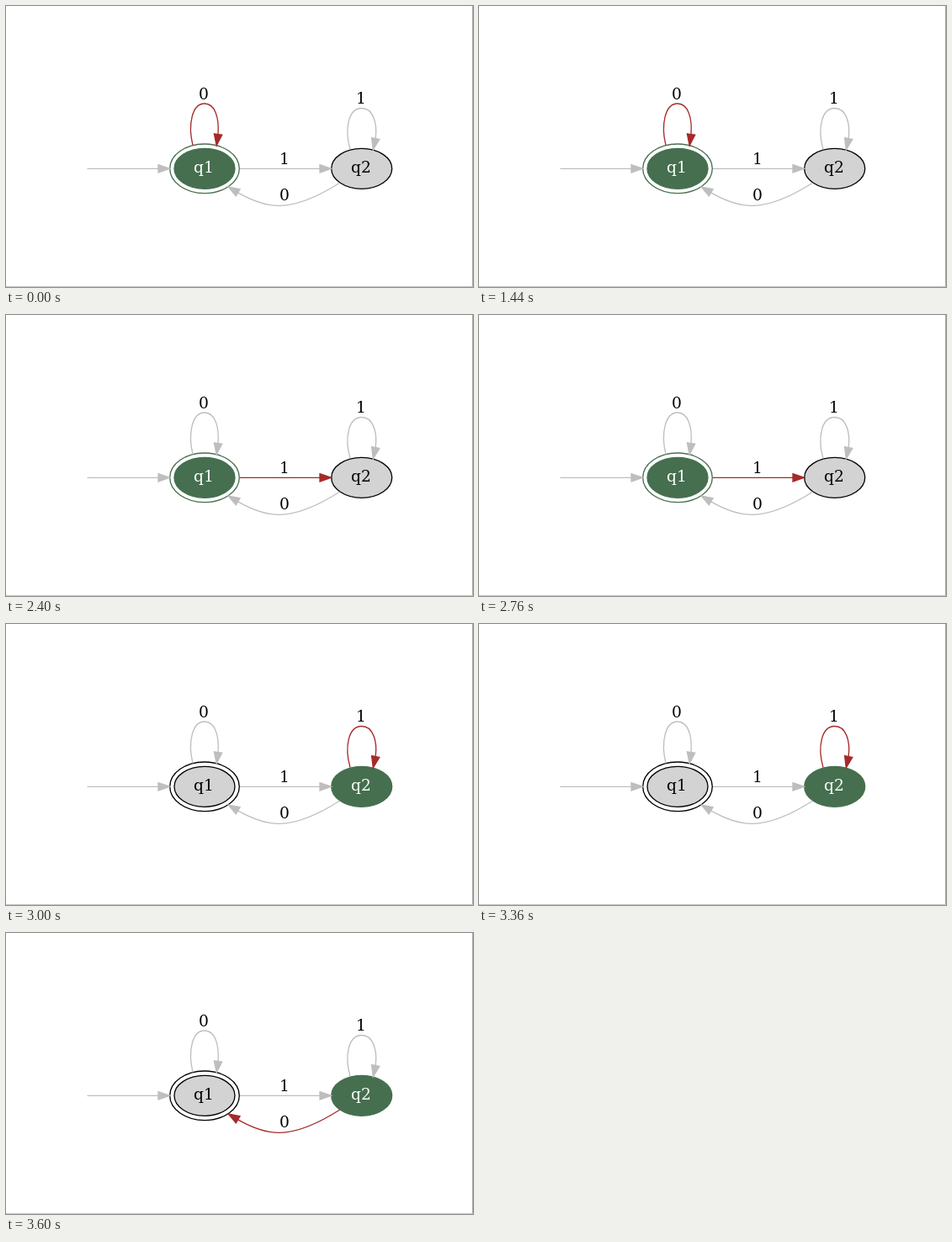
An HTML page that plays this animation: 555x334 px, repeating every 4200 ms.

```html
<!DOCTYPE html>
<html lang="en">
<head>
<meta charset="utf-8">
<title>Two-state automaton</title>
<style>
  html, body { margin: 0; width: 100%; height: 100%; overflow: hidden; background: #fff; }
  svg { display: block; width: 555px; height: 334px; }
  text { font: 18.67px "DejaVu Serif", serif; text-anchor: middle; }
  ellipse { stroke: #000; stroke-width: 1.33; fill: #d3d3d3; }
  ellipse.ring { fill: #fff; }
  .on ellipse { stroke: #456f4e; fill: #456f4e; }
  .on ellipse.ring { fill: #fff; }
  .on text { fill: #fff; }
  .edge { stroke: #bebebe; fill: #bebebe; stroke-width: 1.33; }
  .edge.on { stroke: #a52a2a; fill: #a52a2a; }
  .edge path { fill: none; }
</style>
</head>
<body>
<svg viewBox="0 0 555 334">
  <path d="M554.5 0V334" stroke="#a8a8a8"/>
  <path d="M0 333.5H555" stroke="#c4c4c4"/>
  <g id="q1">
    <ellipse class="ring" cx="236" cy="193.3" rx="41.3" ry="29.3"/>
    <ellipse cx="236" cy="193.3" rx="36" ry="24"/>
    <text x="235" y="198">q1</text>
  </g>
  <g id="q2">
    <ellipse cx="422.7" cy="193.3" rx="36" ry="24"/>
    <text x="422" y="198">q2</text>
  </g>
  <g class="edge">
    <path d="M96.5 193.3H181"/>
    <polygon points="181,188.7 194.5,193.3 181,198"/>
  </g>
  <g class="edge" id="loop1">
    <path d="M222 165.5C216 141 221 116 236 116C248.5 116 253.5 133 252 152.5"/>
    <polygon points="247.4,151.8 256.7,153.2 250.2,166"/>
  </g>
  <g class="edge" id="go">
    <path d="M278 193.3H373"/>
    <polygon points="373,188.7 386.5,193.3 373,198"/>
  </g>
  <g class="edge" id="loop2">
    <path d="M409 170.5C402 146 407 121.5 422.7 121.5C436 121.5 441.5 138.5 439.2 157.5"/>
    <polygon points="434.6,156.6 443.8,158.4 436.3,171"/>
  </g>
  <g class="edge" id="back">
    <path d="M396.5 210.3C378 222 351 237.3 325 237.3C307 237.3 290 230 275.7 221.8"/>
    <polygon points="278,217.8 273.3,225.8 264.2,215"/>
  </g>
  <text x="235" y="111">0</text>
  <text x="331" y="188">1</text>
  <text x="422" y="116">1</text>
  <text x="331" y="231">0</text>
</svg>
<script>
  const LOOP = 4200;
  // Start time, current state, edge being taken
  const steps = [
    [0, "q1", "loop1"],
    [2400, "q1", "go"],
    [3000, "q2", "loop2"],
    [3600, "q2", "back"]
  ];
  const parts = ["q1", "q2", "loop1", "go", "loop2", "back"]
    .map(id => document.getElementById(id));
  const start = performance.now();

  function draw(now) {
    const t = Math.max(0, now - start) % LOOP;
    const step = steps.filter(([from]) => from <= t).pop();
    for (const part of parts) part.classList.toggle("on", step.includes(part.id));
    requestAnimationFrame(draw);
  }
  draw(start);
</script>
</body>
</html>
```
